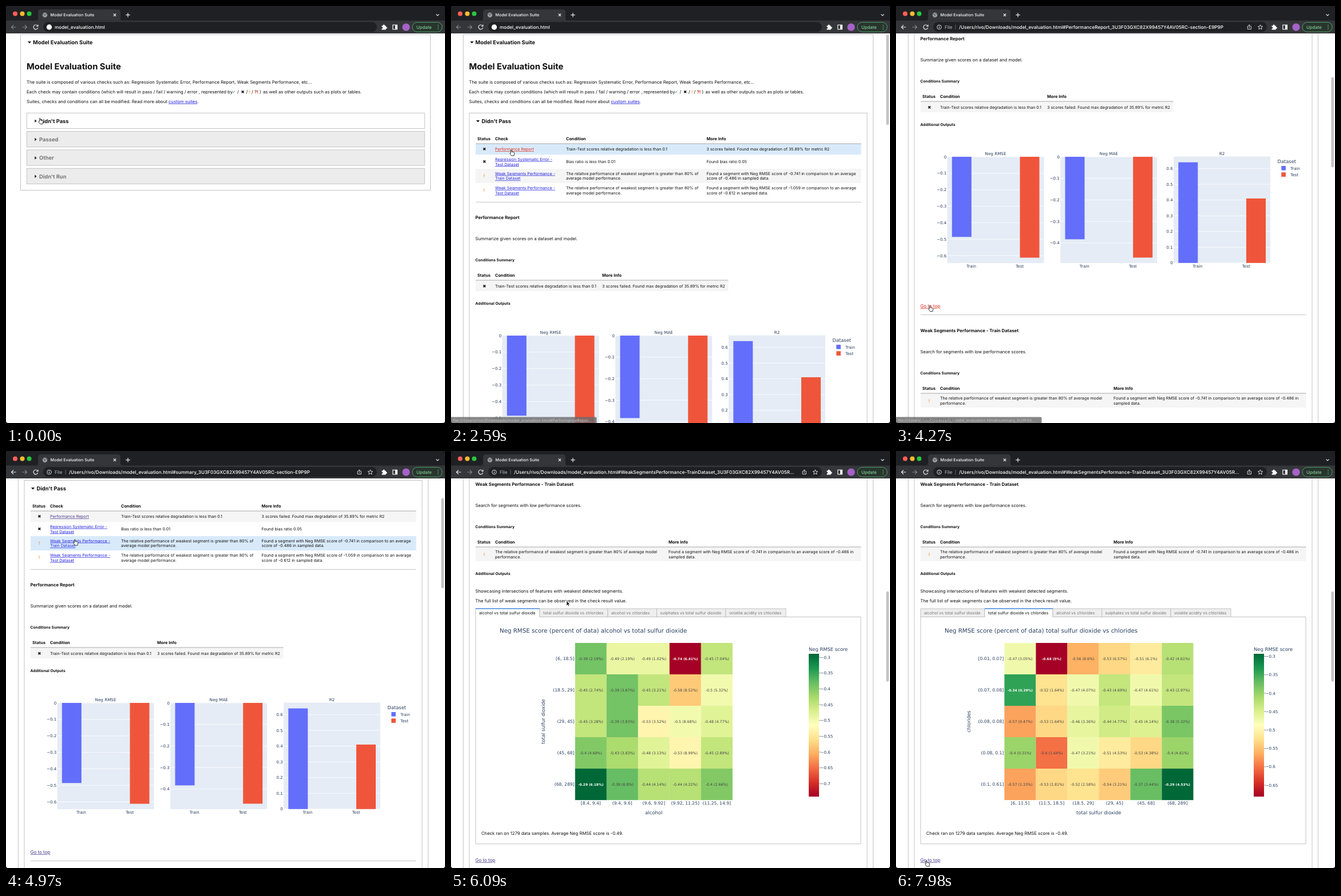
An HTML page that plays this animation: 767 by 730 pixels, repeating every 8000 ms.

```html
<!DOCTYPE html>
<html lang="en">
<head>
<meta charset="utf-8">
<title>Model Evaluation Suite</title>
<style>
html, body { margin: 0; width: 100%; height: 100%; overflow: hidden; background: #000; }
svg { display: block; width: 100vw; height: 100vh; }
text { font-family: Inter, "Open Sans", sans-serif; fill: #111; text-rendering: geometricPrecision; white-space: pre; }
.b { font-weight: 700; }
.m { text-anchor: middle; }
.e { text-anchor: end; }
.plot { font-family: "DejaVu Sans", sans-serif; fill: #2a3f5f; }
.mark { font-family: "DejaVu Sans", sans-serif; text-anchor: middle; }
.link { fill: #2020e0; text-decoration: underline; text-decoration-thickness: .5px; }
.link.visited { fill: #4b3a8c; }
.link.hot { fill: #e02d1b; }
.warn { fill: #ff8c1a; font-weight: 600; }
.grey { fill: #777; }
.bar { fill: #fff; font-weight: 500; }
.icon { fill: none; stroke: #e8eaed; stroke-width: 1.2; }
</style>
</head>
<body>
<svg id="stage" viewBox="0 0 767 730" preserveAspectRatio="none"></svg>
<script>
const LOOP = 8000, STEP = 70;
const USER_PATH = '/Users/rivo/Downloads/model_evaluation.html#';
const TOKEN = '3U3F03GXC82X99457Y4AV05R';

// y is the middle of the capitals
const text = (x, y, s, size = 7.69, cls = '', extra = '') =>
  `<text x="${x}" y="${(y + size * .36).toFixed(2)}" font-size="${size}" class="${cls}" ${extra}>${s}</text>`;
const rect = (x, y, w, h, fill, extra = '') =>
  `<rect x="${x}" y="${y}" width="${w}" height="${h}" fill="${fill}" ${extra}/>`;
const box = (x, y, w, h, fill = '#fff') => rect(x, y, w, h, fill, 'stroke="#bcbcbc" stroke-width=".9"');
const line = (x1, x2, y, color, w = 1) =>
  `<path d="M${x1} ${y}H${x2}" stroke="${color}" stroke-width="${w}"/>`;
const group = (id, inner, extra = '') => `<g id="${id}" ${extra}>${inner}</g>`;
const caret = (x, y, open) =>
  `<path d="${open ? `M${x - 3} ${y - 1.5}h6l-3 3.6z` : `M${x - 1.5} ${y - 2.8}v5.6l3.2-2.8z`}" fill="#111"/>`;
const cross = (x, y) => text(x, y, '✖', 7.4, 'mark');
const bang = y => text(58, y, '!', 7.6, 'warn m');
const cells = (x, y, lines, cls = '') =>
  lines.map((s, i) => text(x, y + (i - (lines.length - 1) / 2) * 8.8, s, 7.1, cls)).join('');
const heads = (y, cols) => cols.map(([x, s]) => text(x, y, s, 7.3, 'b')).join('');

function introView() {
  const y = 150;
  return caret(36.5, 63.5, true) + text(42.5, 63.5, 'Model Evaluation Suite', 9.4, 'b')
    + text(31.5, 106, 'Model Evaluation Suite', 14.8, 'b')
    + text(31.5, 133, 'The suite is composed of various checks such as: Regression Systematic Error, Performance Report, Weak Segments Performance, etc...')
    + text(31.5, y, 'Each check may contain conditions (which will result in pass / fail / warning / error , represented by')
    + text(394, y, '✓', 7.6, 'mark', 'style="fill:#2a8a5a"') + text(399.5, y, '/')
    + cross(409, y) + text(415, y, '/') + text(420, y, '!', 7.62, 'warn') + text(424.5, y, '/')
    + text(429.5, y, '?!', 7.62, 'b', 'style="fill:#c0281c"') + text(438.5, y, ')')
    + text(444.5, y, 'as well as other outputs such as plots or tables.')
    + text(31.5, 167, 'Suites, checks and conditions can all be modified. Read more about <tspan class="link">custom suites</tspan>.');
}

function collapsedView() {
  const sections = ["Didn't Pass", 'Passed', 'Other', "Didn't Run"];
  return box(21, 50, 716, 272.5) + introView() + sections.map((s, i) => {
    const y = 187.3 + i * 32.3;
    return box(31.8, y, 695, 27.2, i ? '#ececec' : '#fff') + caret(47.3, y + 14, false)
      + text(53.5, y + 14, s, 9.4, i ? 'b grey' : 'b');
  }).join('');
}

const ROWS = [
  { y: 241, h: 19.5, link: ['Performance Report'], cond: ['Train-Test scores relative degradation is less than 0.1'],
    info: ['3 scores failed. Found max degradation of 35.89% for metric R2'] },
  { y: 260.5, h: 24.5, link: ['Regression Systematic Error -', 'Test Dataset'], cond: ['Bias ratio is less than 0.01'],
    info: ['Found bias ratio 0.05'] },
  ...['Train', 'Test'].map((set, i) => ({ y: 285 + i * 25.3, h: 25.3, warn: true,
    link: ['Weak Segments Performance -', set + ' Dataset'],
    cond: ['The relative performance of weakest segment is greater than 80% of', 'average model performance.'],
    info: [`Found a segment with Neg RMSE score of ${['-0.741', '-1.059'][i]} in comparison to an average`,
      `score of ${['-0.486', '-0.612'][i]} in sampled data.`] }))
];

function summaryView() {
  return caret(47, 201.5, true) + text(53.5, 201.5, "Didn't Pass", 9.4, 'b')
    + heads(232.5, [[46, 'Status'], [77, 'Check'], [201, 'Condition'], [446.5, 'More Info']])
    + ROWS.map((r, i) => {
      const mid = r.y + r.h / 2 - .2;
      return rect(43, r.y, 673.5, r.h, '#fff', `id="row${i}"`)
        + (r.warn ? bang(mid) : cross(58.3, mid))
        + group('link' + i, cells(77, mid, r.link, 'link'))
        + cells(201, mid, r.cond) + cells(446.5, mid, r.info);
    }).join('') + line(43, 716.5, 241, '#a8a8a8') + line(43, 716.5, 343.3, '#c4c4c4');
}

function barChart(x, title, zero, scale, train, test) {
  const yOf = v => zero - v * scale, sign = Math.sign(train);
  let out = rect(x, 576.5, 169, 186.5, '#e5ecf6');
  for (let i = 0; i <= Math.floor(Math.max(Math.abs(train), Math.abs(test)) * 10); i++) {
    const y = yOf(sign * i / 10);
    out += line(x, x + 169, y, '#fff', i ? .8 : 1.2)
      + text(x - 1.3, y, i ? (sign < 0 ? '−' : '') + i / 10 : '0', 7.1, 'plot e');
  }
  const column = (dx, v, fill) => rect(x + dx, Math.min(zero, yOf(v)), 34, Math.abs(v) * scale, fill);
  return out + column(8.3, train, '#636efa') + column(127, test, '#ef553b')
    + text(x + 84.5, 571.5, title, 7.2, 'plot m')
    + text(x + 42, 768, 'Train', 7.1, 'plot m') + text(x + 126.7, 768, 'Test', 7.1, 'plot m');
}

function reportView() {
  return text(42.5, 370, 'Performance Report', 7.82, 'b')
    + text(42.5, 407, 'Summarize given scores on a dataset and model.')
    + text(42.5, 444.5, 'Conditions Summary', 6.7, 'b')
    + heads(471.5, [[46, 'Status'], [77, 'Condition'], [264, 'More Info']])
    + rect(43, 480, 441.5, 19, '#f5f5f5') + line(43, 484.5, 480, '#a8a8a8')
    + cross(58.3, 490) + cells(77, 490, ROWS[0].cond) + cells(264, 490, ROWS[0].info)
    + text(42.5, 521, 'Additional Outputs', 6.7, 'b')
    + barChart(89.5, 'Neg RMSE', 577, 288.5, -.486, -.612)
    + barChart(287.2, 'Neg MAE', 577, 377, -.383, -.468)
    + barChart(485, 'R2', 762.8, 275.3, .64, .41)
    + text(666.5, 585.5, 'Dataset', 8.3, 'plot')
    + rect(673.3, 593, 7.6, 7.6, '#636efa') + text(689, 597, 'Train', 7.1, 'plot')
    + rect(673.3, 604.3, 7.6, 7.6, '#ef553b') + text(689, 608.3, 'Test', 7.1, 'plot')
    + text(42.5, 838, 'Go to top', 8, 'link', 'id="top0"')
    + line(43, 716.5, 853.5, '#dedede', 2);
}

const RAMP = ['a50026', 'd73027', 'f46d43', 'fdae61', 'fee08b', 'ffffbf', 'd9ef8b', 'a6d96a', '66bd63', '1a9850', '006837'];
function rampColor(t) {
  const p = Math.min(Math.max(t, 0), 1) * 10, i = Math.min(Math.floor(p), 9);
  const channel = (hex, k) => parseInt(hex.slice(k * 2, k * 2 + 2), 16);
  return `rgb(${[0, 1, 2].map(k => Math.round(channel(RAMP[i], k) + (channel(RAMP[i + 1], k) - channel(RAMP[i], k)) * (p - i)))})`;
}

// each cell reads "score in hundredths, percent of data"
const MAPS = [
  { x: 'alcohol', y: 'total sulfur dioxide', left: 216.8, labelX: 161, top: -.289, span: .452, min: -.74, lastTick: 70,
    xs: ['[8.4, 9.4]', '(9.4, 9.6]', '(9.6, 9.92]', '(9.92, 11.25]', '(11.25, 14.9]'],
    ys: ['[6, 18.5]', '(18.5, 29]', '(29, 45]', '(45, 68]', '(68, 289]'],
    rows: ['39 2.19,49 2.19,49 1.02,74 6.41,45 7.04', '45 2.74,39 3.67,45 3.21,58 8.52,50 5.32',
      '45 3.28,39 3.83,53 3.52,50 8.68,48 4.77', '40 4.69,43 3.83,48 3.13,53 8.99,45 2.89',
      '29 6.18,38 6.8,44 4.14,44 4.22,40 2.66'] },
  { x: 'total sulfur dioxide', y: 'chlorides', left: 189.4, labelX: 127, top: -.293, span: .388, min: -.68, lastTick: 65,
    xs: ['[6, 11.5]', '(11.5, 18.5]', '(18.5, 29]', '(29, 45]', '(45, 68]', '(68, 289]'],
    ys: ['[0.01, 0.07]', '(0.07, 0.08]', '(0.08, 0.08]', '(0.08, 0.1]', '(0.1, 0.61]'],
    rows: ['47 3.05,68 5,56 8.6,53 6.57,51 6.1,42 4.61', '34 0.39,52 1.64,47 4.07,43 4.69,47 4.61,43 2.97',
      '57 0.47,53 1.64,46 3.36,44 4.77,45 4.14,38 5.32', '40 0.31,60 1.64,47 3.21,51 4.53,53 4.38,40 4.61',
      '57 1.33,53 2.81,52 2.58,54 3.21,37 3.44,29 4.53'] }
];

function heatmap(m) {
  const size = 55, y0 = 336;
  let out = text(85, 314.3, `Neg RMSE score (percent of data) ${m.x} vs ${m.y}`, 10.25, 'plot');
  m.rows.forEach((row, j) => {
    const cy = y0 + (j + .5) * size;
    out += text(m.left - 1.2, cy, m.ys[j], 7.6, 'plot e');
    row.split(',').forEach((cell, i) => {
      const [score, share] = cell.split(' '), t = (-score / 100 - m.min) / (-.29 - m.min);
      const strong = t < .05 || t > .85;
      out += rect(m.left + i * size, y0 + j * size, size + .1, size + .1, rampColor(t))
        + text(m.left + (i + .5) * size, cy, `${-score / 100} (${share}%)`, strong ? 5.8 : 6.3, 'plot m',
          strong ? 'style="fill:#fff;font-weight:700"' : 'style="fill:#444"');
    });
  });
  m.xs.forEach((s, i) => out += text(m.left + (i + .5) * size, 616.7, s, 7.6, 'plot m'));
  out += text(354.3, 633, m.x, 8.4, 'plot m')
    + text(0, 0, m.y, 8.4, 'plot m', `transform="translate(${m.labelX} 473.5) rotate(-90)"`)
    + text(625, 347.3, 'Neg RMSE score', 8.4, 'plot') + rect(625, 355, 18, 250, 'url(#ramp)');
  for (let v = 30; v <= m.lastTick; v += 5) {
    const y = 355 + (m.top + v / 100) / m.span * 250;
    out += line(643, 646, y, '#555', .6) + text(645.5, y, '−' + v / 100, 7.15, 'plot');
  }
  return out;
}

const TABS = [[43, 'alcohol vs total sulfur dioxide'], [155, 'total sulfur dioxide vs chlorides'], [274, 'alcohol vs chlorides'],
  [359.5, 'sulphates vs total sulfur dioxide'], [480, 'volatile acidity vs chlorides'], [585]];
const tabs = active => TABS.slice(0, -1).map(([x, s], i) => {
  const w = TABS[i + 1][0] - x, on = i === active;
  return box(x, 276, w, 14.5, on ? '#fff' : '#eee')
    + (on ? rect(x + .5, 290, w - 1, 1.2, '#fff') + line(x, x + w, 276, '#4a90e2', 1.3) : '')
    + text(x + 6, 283.2, s, 7.15, on ? '' : 'grey');
}).join('');

function weakView() {
  return text(42.5, 57.8, 'Weak Segments Performance - Train Dataset', 7.82, 'b')
    + text(42.5, 95, 'Search for segments with low performance scores.')
    + text(42.5, 132.3, 'Conditions Summary', 6.7, 'b')
    + heads(159.3, [[46, 'Status'], [77, 'Condition'], [380, 'More Info']])
    + rect(43, 168, 673.5, 25, '#f5f5f5') + line(43, 716.5, 168, '#a8a8a8') + bang(181)
    + cells(77, 181, ['The relative performance of weakest segment is greater than 80% of average model', 'performance.'])
    + cells(380, 181, ['Found a segment with Neg RMSE score of -0.741 in comparison to an average score of -0.486 in', 'sampled data.'])
    + text(42.5, 215, 'Additional Outputs', 6.7, 'b')
    + text(42.5, 245, 'Showcasing intersections of features with weakest detected segments.')
    + text(42.5, 262, 'The full list of weak segments can be observed in the check result value.')
    + box(43, 290.5, 673, 397.3)
    + MAPS.map((m, i) => group('map' + i, tabs(i) + heatmap(m))).join('')
    + text(53, 669.5, 'Check ran on 1279 data samples. Average Neg RMSE score is -0.49.')
    + text(42.5, 716, 'Go to top', 8, 'link visited');
}

function browserBar() {
  const dot = (x, y, r, fill) => `<circle cx="${x}" cy="${y}" r="${r}" fill="${fill}"/>`;
  const icon = (d, extra = '') => `<path class="icon" d="${d}" ${extra}/>`;
  return rect(0, 0, 767, 48, '#1f2023') + rect(0, 25.5, 767, 22.5, '#35363a')
    + '<path d="M52 25.6q4 0 4-4V11q0-5 5-5h134q5 0 5 5v10.6q0 4 4 4z" fill="#35363a"/>'
    + dot(16, 13.5, 4, '#ff5f57') + dot(28.5, 13.5, 4, '#febc2e') + dot(40.5, 13.5, 4, '#28c840')
    + dot(68, 15.7, 4.2, '#9aa0a6') + icon('M65 14l3 1 0 3M69 12.5l2 2.5', 'style="stroke:#45464a;stroke-width:1"')
    + text(77.5, 15.8, 'Model Evaluation Suite', 7.05, 'bar')
    + icon('M187.8 13.5l4.4 4.4m0-4.4l-4.4 4.4M213 12v7.4M209.3 15.7h7.4M751.5 14.3l2.5 2.5 2.5-2.5')
    + icon('M17.5 37h-8m3.6-3.6L9.5 37l3.6 3.6', 'id="back"')
    + icon('M28.5 37h8m-3.6-3.6l3.6 3.6-3.6 3.6', 'style="stroke:#85878b"')
    + icon('M55 34.5a3.9 3.9 0 1 0 .7 3.4M56 32.7v2.8h-2.9')
    + rect(65, 28, 583, 17.4, '#1f2023', 'rx="8.7"')
    + group('localPage', dot(75.5, 37, 4.7, '#fff') + text(85, 37, 'model_evaluation.html', 8.2, 'bar'))
    + group('filePage', '<circle class="icon" cx="75.5" cy="37" r="3.8" style="stroke-width:.9"/>'
      + icon('M75.5 36.4v2.6M75.5 34.6v1') + text(85, 37, 'File', 8.1, 'bar', 'style="fill:#a5a8ad"')
      + icon('M104 32.7v8.6', 'style="stroke:#777;stroke-width:.8"') + text(110, 37, '', 8.2, 'bar', 'id="url"')
      + icon('M615.5 35.5h-1.3v5h6.2v-5h-1.3M617.3 38.5v-5.6m-1.8 1.7l1.8-1.8 1.8 1.8', 'style="stroke-width:.9"')
      + icon('M636.5 32.8l1.2 2.8 3 .2-2.3 2 .8 3-2.7-1.6-2.7 1.6.8-3-2.3-2 3-.2z', 'style="stroke-width:.9"'))
    + '<path d="M656.5 34.5h2.2a1.5 1.5 0 1 1 2.9 0h2.1v2.2a1.5 1.5 0 1 1 0 2.8v1.9h-7.2v-2a1.4 1.4 0 1 0 0-2.7z" fill="#fff"/>'
    + rect(675.8, 33.2, 7.6, 7.6, 'none', 'stroke="#fff" stroke-width="1.1"') + rect(680, 33.2, 3.4, 7.6, '#fff')
    + dot(699, 37, 6.6, '#a562c8')
    + rect(710, 28.6, 52, 16.6, '#28352d', 'rx="8.3" stroke="#4f9d68" stroke-width="1"')
    + text(717, 37, 'Update', 7.75, 'bar', 'style="fill:#81c995"')
    + [33.8, 37, 40.2].map(y => dot(755, y, .8, '#81c995')).join('');
}

document.getElementById('stage').innerHTML = `<defs>
  <clipPath id="window"><path d="M0 48H767V726a4 4 0 0 1-4 4H4a4 4 0 0 1-4-4Z"/></clipPath>
  <linearGradient id="ramp" x2="0" y2="1">${RAMP.map((c, i) => `<stop offset="${1 - i / 10}" stop-color="#${c}"/>`).reverse().join('')}</linearGradient>
  </defs><g clip-path="url(#window)">${rect(0, 48, 767, 682, '#fff')}`
  + group('collapsed', collapsedView(), 'transform="translate(4.5 0)"')
  + group('page', box(21.3, 50, 716.3, 2600) + introView() + box(32, 187.3, 695, 2400) + summaryView() + reportView()
    + group('weak', weakView(), 'transform="translate(0 823)"'))
  + rect(760.4, 0, 4.6, 158, '#c3c3c3', 'rx="2.3" id="thumb"')
  + group('hint', rect(-3, 719.5, 257.5, 14, '#6c6c6c', 'rx="2" opacity=".82"')
    + text(3, 725, '', 7.03, '', 'id="hintText" style="fill:#c4c4c4"'))
  + '</g>' + browserBar()
  + group('hand', '<path d="M-2.6-4.2c0-1.3 1.7-1.3 1.7 0v2.5l3.5.8c1 .3 1.3.9 1.2 1.8l-.6 2.7v1.5h-4.6l-2.6-3.5c-.6-.9.4-1.8 1.4-1z" fill="#fff" stroke="#222" stroke-width=".9"/>')
  + group('arrow', '<path d="M-2-4.5v8.2l1.9-1.7 1.2 2.8 1.4-.6-1.2-2.7h2.6z" fill="#111" stroke="#fff" stroke-width=".5"/>');

const el = id => document.getElementById(id);
const show = (id, on) => el(id).style.display = on ? '' : 'none';

const SCENES = [
  { at: 0, scroll: 0, closed: true },
  { at: 420, scroll: 0 },
  { at: 2940, scroll: 313, url: `PerformanceReport_${TOKEN}C-section-E9P9P` },
  { at: 4480, scroll: 136, url: `summary_${TOKEN}C-section-E9P9P` },
  { at: 5180, scroll: 823, url: `WeakSegmentsPerformance-TrainDataset_${TOKEN}...` }
];
const TAB_SWITCH = 6650;
// a link turns red while hovered and counts as visited once clicked
const HOVERS = [
  { from: 2450, to: 2940, link: 'link0', hint: 'PerformanceRepor...' },
  { from: 4200, to: 4480, link: 'top0', hint: 'summary_3U3F03...' },
  { from: 5040, to: 5180, link: 'link2', hint: 'WeakSegmentsPerf...' }
];
// time, x, y, pointer shown from then on
const POINTER = [
  [0, 61, 201.5, 'hand'], [700, 61, 201.5, ''], [1540, 230, 350, 'arrow'], [2240, 107, 257, 'hand'],
  [2940, 107, 257, 'arrow'], [3290, 107, 257, 'arrow'], [4060, 61, 529.5, 'hand'], [4550, 61, 529.5, 'arrow'],
  [4900, 122, 160, 'hand'], [5180, 122, 160, 'arrow'], [5460, 122, 160, 'arrow'], [6090, 204, 267, 'arrow'],
  [6370, 213, 283, 'hand'], [6860, 213, 283, 'arrow'], [7770, 55, 722, 'hand'], [LOOP, 55, 722, 'hand']
];

function pointerAt(t) {
  const i = POINTER.findIndex((p, k) => t < POINTER[k + 1][0]);
  const [t0, x0, y0, kind] = POINTER[i], [t1, x1, y1] = POINTER[i + 1];
  const u = (t - t0) / (t1 - t0), k = u * u * (3 - 2 * u);
  return { x: x0 + (x1 - x0) * k, y: y0 + (y1 - y0) * k, kind };
}

function draw(now) {
  const t = Math.floor(now % LOOP / STEP) * STEP;
  const scene = SCENES.filter(s => t >= s.at).pop();
  const hover = HOVERS.find(h => t >= h.from && t < h.to);
  const pointer = pointerAt(t);

  show('collapsed', scene.closed);
  show('page', !scene.closed);
  show('thumb', !scene.closed);
  show('localPage', !scene.url);
  show('filePage', scene.url);
  show('map0', t < TAB_SWITCH);
  show('map1', t >= TAB_SWITCH);
  el('page').setAttribute('transform', `translate(0 ${-scene.scroll})`);
  el('thumb').setAttribute('y', 50 + scene.scroll * .238);
  el('back').style.stroke = scene.url ? '#e8eaed' : '#85878b';
  el('url').textContent = USER_PATH + (scene.url || '');

  ROWS.forEach((r, i) => {
    const y = pointer.y + scene.scroll;
    const over = pointer.kind && y >= r.y && y < r.y + r.h;
    el('row' + i).setAttribute('fill', over ? '#d8eafa' : i % 2 ? '#fff' : '#f5f5f5');
  });
  for (const h of HOVERS) {
    const node = el(h.link), links = node.tagName === 'g' ? [...node.children] : [node];
    links.forEach(n => {
      n.classList.toggle('visited', t >= h.to);
      n.classList.toggle('hot', h === hover);
    });
  }
  show('hint', hover);
  if (hover) el('hintText').textContent = 'file://' + USER_PATH + hover.hint;

  for (const kind of ['hand', 'arrow']) {
    show(kind, pointer.kind === kind);
    el(kind).setAttribute('transform', `translate(${pointer.x} ${pointer.y})`);
  }
}

function tick() {
  draw(performance.now());
  requestAnimationFrame(tick);
}
tick();
</script>
</body>
</html>
```
